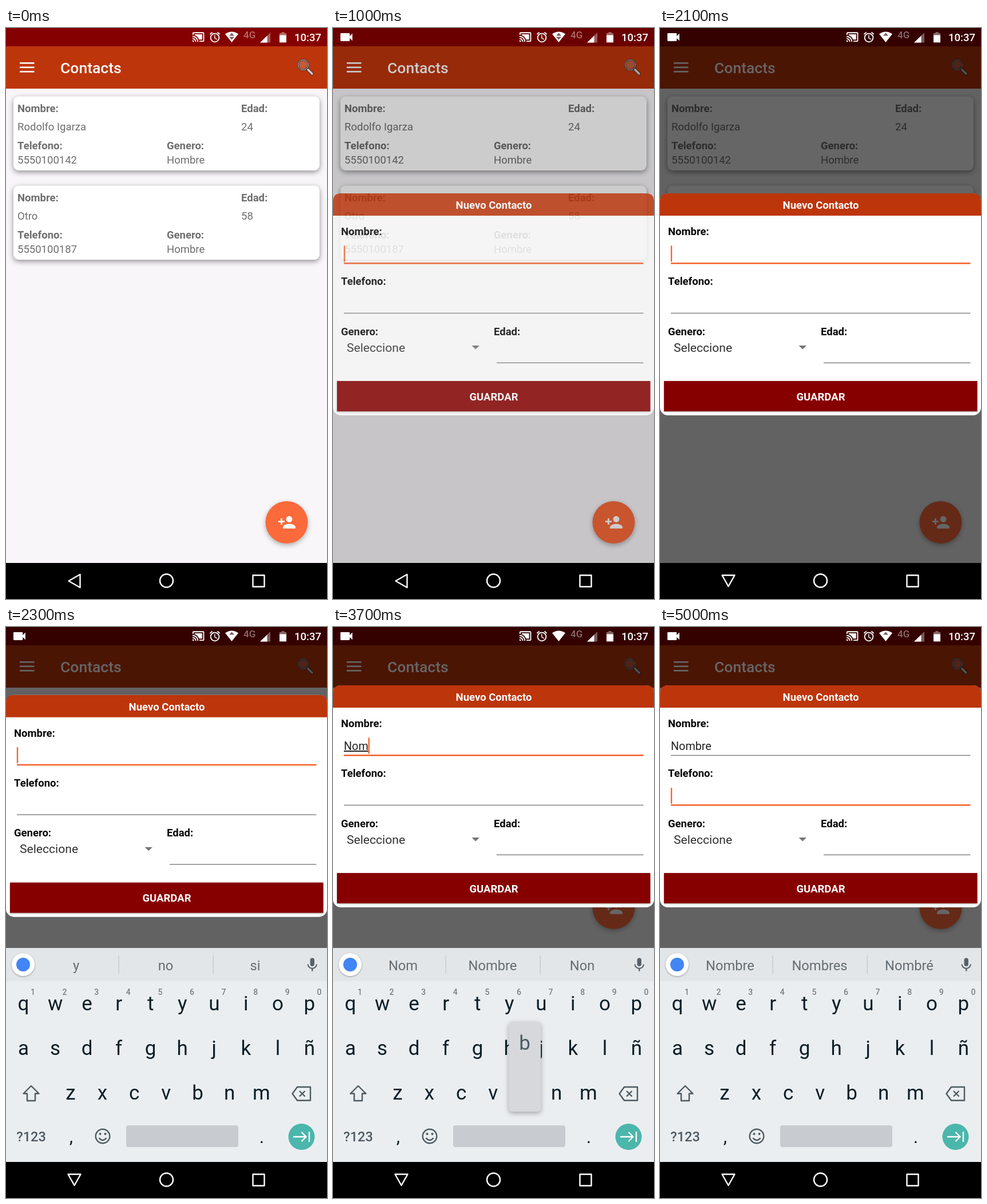
An HTML page that plays this animation: 561 by 998 pixels, repeating every 5100 ms.

```html
<!DOCTYPE html>
<html lang="es">
<head>
<meta charset="utf-8">
<title>Contacts</title>
<style>
  html, body { margin: 0; width: 100%; height: 100%; overflow: hidden; background: #000; }
  svg { display: block; }
  text { font-family: Roboto, sans-serif; white-space: pre; }
  .bold { font-weight: 700; }
  .medium { font-weight: 500; }
  .mid { text-anchor: middle; }
  .end { text-anchor: end; }
  .line { fill: none; stroke-width: 2.4; stroke-linejoin: round; }
  .card { filter: drop-shadow(0 3px 5px rgba(0,0,0,.42)); }
  .raised { filter: drop-shadow(0 3px 4px rgba(0,0,0,.3)); }
  .low { filter: drop-shadow(0 1px 1.5px rgba(0,0,0,.35)); }
</style>
</head>
<body>
<svg id="stage" width="100%" height="100%" viewBox="0 0 561 998"></svg>
<script>
const LOOP = 5100, STEP = 100;
const ORANGE = '#f4652f', RUST = '#bd350b', GREY = '#858585', INK = '#0c1e28', SLATE = '#4d5a62';

const text = (x, y, size, str, cls = '', fill = '#fff', id = '') =>
  `<text x="${x}" y="${y}" font-size="${size}" class="${cls}" fill="${fill}"${id && ` id="${id}"`}>${str}</text>`;
const rect = (x, y, w, h, fill, extra = '') =>
  `<rect x="${x}" y="${y}" width="${w}" height="${h}" fill="${fill}" ${extra}/>`;
const icon = (x, y, scale, d, fill = '#fff', id = '') =>
  `<path id="${id}" transform="translate(${x} ${y}) scale(${scale})" fill="${fill}" d="${d}"/>`;

const ICONS = {
  camera: 'M17 10.5V7c0-.55-.45-1-1-1H4c-.55 0-1 .45-1 1v10c0 .55.45 1 1 1h12c.55 0 1-.45 1-1v-3.5l4 4v-11z',
  cast: 'M1 18v3h3c0-1.66-1.34-3-3-3zm0-4v2c2.76 0 5 2.24 5 5h2c0-3.87-3.13-7-7-7zm18-7H5v1.63c3.96 1.28 7.09 4.41 8.37 8.37H19zM1 10v2c4.97 0 9 4.03 9 9h2c0-6.08-4.93-11-11-11zm20-7H3c-1.1 0-2 .9-2 2v3h2V5h18v14h-7v2h7c1.1 0 2-.9 2-2V5c0-1.1-.9-2-2-2z',
  alarm: 'M22 5.72l-4.6-3.86-1.29 1.53 4.6 3.86zM7.88 3.39L6.6 1.86 2 5.71l1.29 1.53zM12.5 8H11v6l4.75 2.85.75-1.23-4-2.37zM12 4a9 9 0 1 0 0 18 9 9 0 0 0 0-18zm0 16a7 7 0 1 1 0-14 7 7 0 0 1 0 14z',
  addPerson: 'M15 12a4 4 0 1 0 0-8 4 4 0 0 0 0 8zm-9-2V7H4v3H1v2h3v3h2v-3h3v-2zm9 4c-2.67 0-8 1.34-8 4v2h16v-2c0-2.66-5.33-4-8-4z',
  mic: 'M12 14c1.66 0 3-1.34 3-3V5a3 3 0 0 0-6 0v6c0 1.66 1.34 3 3 3zm5.3-3c0 3-2.54 5.1-5.3 5.1S6.7 14 6.7 11H5c0 3.41 2.72 6.23 6 6.72V21h2v-3.28c3.28-.48 6-3.3 6-6.72z'
};

function contactCard(y, name, age, phone) {
  const label = (x, dy, s) => text(x, y + dy, 18.5, s, 'bold', '#6e6e6e');
  const value = (x, dy, s) => text(x, y + dy, 18.5, s, '', '#6e6e6e');
  return rect(13, y, 535, 129.5, '#fff', 'rx="9" class="card"') +
    label(20, 27.5, 'Nombre:') + label(411, 27.5, 'Edad:') +
    value(20, 59.5, name) + value(411, 59.5, age) +
    label(20, 92, 'Telefono:') + label(281, 92, 'Genero:') +
    value(20, 117.5, phone) + value(281, 117.5, 'Hombre');
}

const app = rect(0, 0, 561, 935, '#f8f6f9') +
  `<svg width="561" height="418">${
    contactCard(119.5, 'Rodolfo Igarza', '24', '5550100142') +
    contactCard(275.5, 'Otro', '58', '5550100187')}</svg>` +
  rect(0, 0, 561, 32, '#850000') + rect(0, 32, 561, 74, RUST) +
  [60, 67.5, 75].map(y => rect(24, y, 25.5, 2.6, '#fff')).join('') +
  text(95, 79, 26.5, 'Contacts', 'medium') +
  `<g fill="none" stroke-linecap="round">
     <path d="M526 71L535 80" stroke="#4a3530" stroke-width="6"/>
     <path d="M527.5 72.5L535 80" stroke="#d8ccc8" stroke-width="3.4"/>
     <circle cx="519.5" cy="64.5" r="9" fill="#cfa497" fill-opacity=".35" stroke="#4a3530" stroke-width="3"/>
     <circle cx="519.5" cy="64.5" r="9" stroke="#c9bbb6" stroke-width="1"/>
   </g>
   <g id="fab"><circle cx="490.5" cy="864" r="37" fill="#fa6a3a" class="raised"/>${
     icon(474.6, 847.6, 1.36, ICONS.addPerson)}</g>`;

const status = icon(9.5, 2, 1.16, ICONS.camera, '#fff', 'camera') +
  icon(325, 4.5, .93, ICONS.cast) + icon(354, 5, .92, ICONS.alarm) +
  `<path d="M383 10.5Q394.5 2.5 406 10.5L394.5 25Z" fill="#fff"/>
   <path id="wifiUp" d="M390 13.5h9l-4.5-5z" fill="#7d5a5a"/>
   <path id="wifiDown" d="M390 15.5h9l-4.5 5z" fill="#7d5a5a"/>` +
  text(415, 18, 17, '4G', 'medium', 'rgba(255,255,255,.42)') +
  `<path d="M444 25.5L462 8V25.5Z" fill="#fff" fill-opacity=".35"/>
   <path d="M444 25.5L456.5 13.4V25.5Z" fill="#fff"/>
   <path d="M478 9h3.5V7h5v2h3.5v4h-12z" fill="#fff" fill-opacity=".4"/>` +
  rect(478, 12.5, 12, 12.8, '#fff') + text(551, 23, 18.5, '10:37', 'medium end');

const label = (x, y, s) => text(x, y, 18.5, s, 'bold', '#080808');
const dialog = rect(0, 0, 561, 388, '#fff', 'rx="14"') +
  `<path d="M0 39V14Q0 0 14 0H547Q561 0 561 14V39Z" fill="${RUST}"/>` +
  text(281, 27, 18.5, 'Nuevo Contacto', 'bold mid') +
  label(14, 73, 'Nombre:') + label(14, 160, 'Telefono:') +
  label(14, 247.5, 'Genero:') + label(281, 247.5, 'Edad:') +
  text(24, 276.5, 21.1, 'Seleccione', '', '#303030') +
  `<path d="M242.5 266h13.5l-6.75 6.5z" fill="#757575"/>` +
  rect(19, 121, 523.5, 2.6, ORANGE, 'id="nameLine"') +
  rect(19, 208, 523.5, 1.5, GREY, 'id="phoneLine"') +
  rect(286, 295.5, 256.5, 1.5, GREY) +
  text(19, 113, 19.8, '', '', '#222', 'typed') +
  rect(19, 91.5, 2.4, 28, ORANGE, 'id="cursor"') +
  rect(7, 328, 547.5, 53, '#870000', 'class="low"') +
  text(281, 361.5, 18.5, 'GUARDAR', 'bold mid');

// Key centres and baselines, shared by the keyboard and the key popup.
const ROWS = ['qwertyuiop', 'asdfghjklñ', 'zxcvbnm'];
const keys = ROWS.flatMap((row, r) => [...row].map((char, i) =>
  ({ char, x: (r === 2 ? 113 : 30.5) + 55.55 * i, y: 670 + 78 * r })));
const letters = upper => keys.map(k =>
  text(k.x, k.y + (upper ? 2 : 0), 35, upper ? k.char.toUpperCase() : k.char, 'mid', INK)).join('');
const shiftArrow = 'M44 802L57.5 815.5H51V828H37V815.5H30.5Z';

const keyboard = rect(0, 561, 561, 374, '#ebeef0') + rect(0, 561, 561, 58, '#e3e6e8') +
  `<circle cx="30" cy="590" r="20" fill="#fff" class="low"/><circle cx="30" cy="590" r="12" fill="#4285f4"/>` +
  [122.5, 279, 435.5].map(x => text(x, 599.5, 23.7, '', 'mid suggestion', '#646d73')).join('') +
  rect(196.5, 574, 1.3, 32, '#c3c7ca') + rect(361.5, 574, 1.3, 32, '#c3c7ca') +
  icon(520.6, 576, 1.22, ICONS.mic, '#566068') +
  [...'1234567890'].map((d, i) => text(47 + 55.6 * i, 643, 14, d, 'medium mid', '#777f85')).join('') +
  `<g id="lower">${letters(false)}<path class="line" stroke="${SLATE}" d="${shiftArrow}"/></g>
   <g id="upper">${rect(6, 783, 76, 63, '#d9dcdf') + letters(true)}<path fill="${SLATE}" d="${shiftArrow}"/></g>
   <path class="line" stroke="${SLATE}" d="M509 804H532V827.5H509L500.5 815.7ZM513 811l9.5 9.5M522.5 811l-9.5 9.5"/>` +
  text(44, 899, 23.5, '?123', 'medium mid', SLATE) +
  text(114, 901, 32, ',', 'mid', INK) + text(447, 902, 32, '.', 'mid', INK) +
  `<g class="line" stroke="${SLATE}"><circle cx="169" cy="890" r="12.3"/><path d="M162.5 893Q169 901 175.5 893"/></g>
   <circle cx="164.5" cy="886" r="2" fill="${SLATE}"/><circle cx="173.5" cy="886" r="2" fill="${SLATE}"/>` +
  rect(210, 871, 196, 38, '#c8cbcf', 'rx="4"') +
  `<circle cx="516.5" cy="891" r="23" fill="#4bb6ac"/>
   <path class="line" stroke="#fff" d="M502 891H524M516.5 883L524.5 891L516.5 899M530 882V900"/>
   <g id="popup">${rect(-28, -136, 56, 157, '#d6d8db', 'rx="6" class="raised"') +
     text(0, -87, 35, '', 'mid', SLATE, 'popupChar')}</g>`;

const nav = rect(0, 935, 561, 63, '#000') +
  `<g class="line" stroke="#fff"><path id="back"/><circle cx="280.5" cy="966" r="11.5"/>
   <rect x="431.5" y="956.5" width="20" height="20"/></g>`;

document.getElementById('stage').innerHTML = app + rect(0, 0, 561, 935, '#000', 'id="dim"') + status +
  `<g id="dialog">${dialog}</g><g id="keyboard">${keyboard}</g>` + nav;

const $ = id => document.getElementById(id);
const suggestions = document.querySelectorAll('.suggestion');
const show = (id, on) => $(id).setAttribute('visibility', on ? 'inherit' : 'hidden');
const attr = (id, values) => { for (const k in values) $(id).setAttribute(k, values[k]); };
const move = (id, x, y) => attr(id, { transform: `translate(${x} ${y})` });
const clamp = (v, lo = 0, hi = 1) => Math.min(hi, Math.max(lo, v));

const WORD = 'Nombre';
const HINTS = ['Y No Si', 'N No Ni', 'No Nos Non', 'Nom Nombre Non',
  'Nomb Nombre Nombres', 'Nombr Nombre Nombres', 'Nombre Nombres Nombré'];

function underline(id, y, focused) {
  attr(id, { y: focused ? y : y + .7, height: focused ? 2.6 : 1.5, fill: focused ? ORANGE : GREY });
}

function render(t) {
  show('camera', t >= 100);
  show('wifiUp', t < 3400 || t >= 4900);
  show('wifiDown', t < 2000 || (t >= 2600 && t < 3400));

  // Dialog fades in, then slides up as the keyboard opens.
  attr('dim', { opacity: clamp((t - 850) / 450) * .6 });
  const rise = 1 - (1 - clamp((t - 2100) / 285)) ** 2;
  attr('dialog', { opacity: clamp((t - 800) / 245) });
  move('dialog', 0, 289 - 187 * rise);
  show('dialog', t > 800);
  move('fab', 0, t >= 2400 ? -373 : 0);
  show('keyboard', t >= 2200);
  move('keyboard', 0, t < 2300 ? 75 : 0);
  attr('back', { d: t >= 2000 ? 'M108.5 956.5H130.5L119.5 976Z' : 'M109.5 966.5L129.5 955V978Z' });

  // One key every 200 ms: pressed for 100 ms, then its letter is entered.
  const count = clamp(Math.floor((t - 3000) / 200), 0, WORD.length);
  const pressed = t >= 3100 && t < 4200 && (t - 3100) % 200 < 100;
  const capital = t >= 2400 && count === 0;
  show('upper', capital);
  show('lower', !capital);
  show('popup', pressed);
  if (pressed) {
    const char = WORD[count], key = keys.find(k => k.char === char.toLowerCase());
    $('popupChar').textContent = char;
    move('popup', key.x, key.y);
  }
  const hints = t < 2400 ? 'y no si' : HINTS[count];
  hints.split(' ').forEach((s, i) => suggestions[i].textContent = s);

  const onPhone = t >= 4900;
  $('typed').textContent = WORD.slice(0, count);
  attr('typed', { 'text-decoration': onPhone ? 'none' : 'underline' });
  underline('nameLine', 121, !onPhone);
  underline('phoneLine', 208, onPhone);
  const width = onPhone || !count ? 0 : $('typed').getComputedTextLength();
  attr('cursor', { x: 18.8 + width, y: onPhone ? 179 : 91.5 });
  show('cursor', !(t >= 1500 && t < 1900) && !(t >= 2600 && t < 2800));
}

const start = performance.now();
function tick() {
  const t = (performance.now() - start) % LOOP;
  render(Math.floor(t / STEP) * STEP);
  requestAnimationFrame(tick);
}
tick();
</script>
</body>
</html>
```
